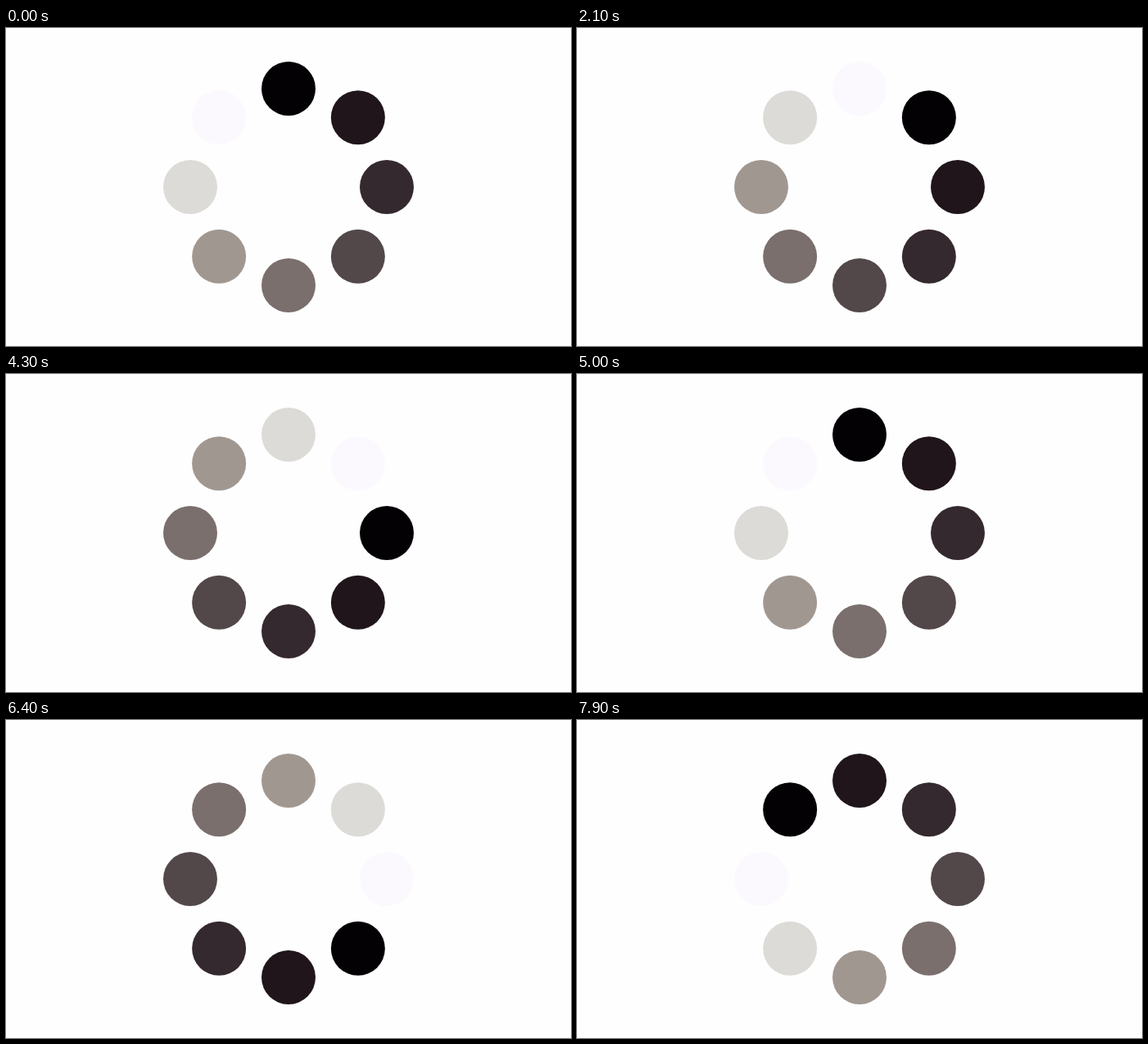
Animation, 690 px wide and 388 px high, one loop 8 s. Source, as an HTML page with a canvas:

```html
<!DOCTYPE html>
<html lang="en">
<head>
<meta charset="utf-8">
<title>Dot spinner</title>
<style>
  html, body { margin: 0; width: 100%; height: 100%; overflow: hidden; background: #fefefe; }
  canvas { display: block; }
</style>
</head>
<body>
<canvas id="stage" width="690" height="388"></canvas>
<script>
const ctx = document.getElementById('stage').getContext('2d');
const SHADES = ['#030104', '#1f151a', '#34292e', '#524749', '#7a6f6d', '#a19791', '#dcdbd7', '#fcf9fe'];
const COUNT = SHADES.length;
const CENTER = { x: 345, y: 194 };
const RING = 120;
const DOT = 33;
const LOOP = 8000;
const TICK = 100;

// The ring advances one dot every 125 ms, sampled at 10 frames per second.
function stepAt(ms) {
  const tick = Math.floor((ms % LOOP) / TICK);
  return Math.floor(tick * TICK / 125 + 0.3);
}

function draw(step) {
  ctx.fillStyle = '#fefefe';
  ctx.fillRect(0, 0, 690, 388);
  SHADES.forEach((shade, i) => {
    const angle = (i + step) % COUNT * 2 * Math.PI / COUNT - Math.PI / 2;
    ctx.fillStyle = shade;
    ctx.beginPath();
    ctx.arc(CENTER.x + RING * Math.cos(angle), CENTER.y + RING * Math.sin(angle), DOT, 0, 2 * Math.PI);
    ctx.fill();
  });
}

let start;
function frame(now) {
  start ??= now;
  draw(stepAt(Math.max(0, now - start)));
  requestAnimationFrame(frame);
}
draw(0);
requestAnimationFrame(frame);
</script>
</body>
</html>
```
